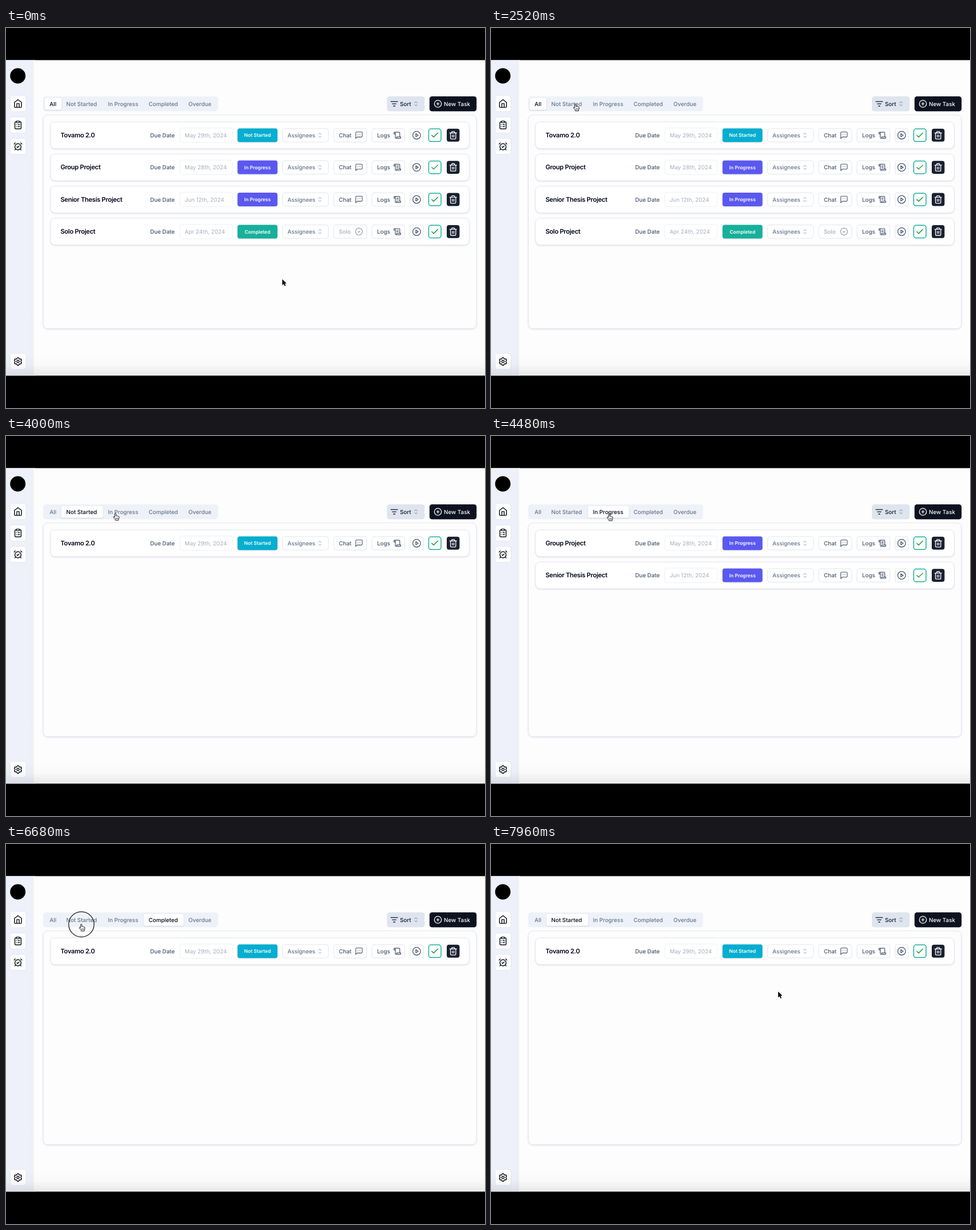
Write an HTML page that moves like this. It is 839 by 667 pixels and loops after 8 s.

```html
<!DOCTYPE html>
<html lang="en">
<head>
<meta charset="utf-8">
<title>Task board</title>
<style>
  html, body { margin: 0; width: 100%; height: 100%; overflow: hidden; background: #000; }
  svg { display: block; width: 100vw; height: 100vh; }
  text { font: 500 9.85px Inter, sans-serif; text-rendering: geometricPrecision; white-space: pre; }
  .title { font-size: 11.2px; font-weight: 600; letter-spacing: -.028em; }
  .date { font-weight: 400; }
  .badge { font-size: 8.5px; font-weight: 600; text-anchor: middle; }
  .raised { filter: drop-shadow(0 1px 1px rgba(15, 23, 42, .13)); }
  .soft { filter: drop-shadow(0 .6px .6px rgba(15, 23, 42, .07)); }
</style>
</head>
<body>
<svg id="stage" viewBox="0 0 839 667"></svg>
<script>
const LOOP = 8000, STEP = 40;
const INK = '#0f172a', SLATE = '#64748b', DEEP = '#475569', LINE = '#e2e8f0', FAINT = '#a6adb9';

const circle = (x, y, r) => `M${x - r} ${y}a${r} ${r} 0 1 0 ${2 * r} 0a${r} ${r} 0 1 0 ${-2 * r} 0`;

function gearPath() {
  const points = [];
  for (let tooth = 0; tooth < 6; tooth++) {
    for (const [angle, radius] of [[-21, 7.6], [-11, 10], [11, 10], [21, 7.6]]) {
      const a = (tooth * 60 + angle - 90) * Math.PI / 180;
      points.push(`${(12 + radius * Math.cos(a)).toFixed(2)} ${(12 + radius * Math.sin(a)).toFixed(2)}`);
    }
  }
  return `M${points.join('L')}Z${circle(12, 12, 3)}`;
}

// Outlines on a 24 unit grid.
const scroll = 'M8 21h12a2 2 0 0 0 2-2v-2H10v2a2 2 0 1 1-4 0V5a2 2 0 1 0-4 0v3h4M19 17V5a2 2 0 0 0-2-2H4';
const ICONS = {
  home: 'M3 9l9-7 9 7v11a2 2 0 0 1-2 2H5a2 2 0 0 1-2-2zM9 22V12h6v10',
  clipboard: 'M9 2h6a1 1 0 0 1 1 1v2a1 1 0 0 1-1 1H9a1 1 0 0 1-1-1V3a1 1 0 0 1 1-1zM16 4h2a2 2 0 0 1 2 2v14a2 2 0 0 1-2 2H6a2 2 0 0 1-2-2V6a2 2 0 0 1 2-2h2M12 11h4M12 16h4M8 11h.01M8 16h.01',
  alarm: circle(12, 13, 8) + 'M5 3L2 6M22 6l-3-3M6.4 18.7L4 21M17.6 18.7L20 21M9 13l2 2 4-4',
  gear: gearPath(),
  filter: 'M3 6h18M7 12h10M10 18h4',
  chevrons: 'M7 15l5 5 5-5M7 9l5-5 5 5',
  plus: circle(12, 12, 10) + 'M8 12h8M12 8v8',
  chat: 'M21 15a2 2 0 0 1-2 2H7l-4 4V5a2 2 0 0 1 2-2h14a2 2 0 0 1 2 2zM8 10h.01M12 10h.01M16 10h.01',
  solo: 'M3.85 8.62a4 4 0 0 1 4.78-4.77 4 4 0 0 1 6.74 0 4 4 0 0 1 4.78 4.78 4 4 0 0 1 0 6.74 4 4 0 0 1-4.77 4.78 4 4 0 0 1-6.75 0 4 4 0 0 1-4.78-4.77 4 4 0 0 1 0-6.76zM9 12l2 2 4-4',
  scroll,
  scrollText: scroll + 'M15 8h-5M15 12h-5',
  play: circle(12, 12, 10) + 'M10 8l6 4-6 4z',
  check: 'M20 6L9 17l-5-5',
  trash: 'M3 6h18M19 6v14a2 2 0 0 1-2 2H7a2 2 0 0 1-2-2V6M8 6V4a2 2 0 0 1 2-2h4a2 2 0 0 1 2 2v2M10 11v6M14 11v6'
};

const icon = (name, x, y, scale, color, width = 2) =>
  `<path d="${ICONS[name]}" transform="translate(${x} ${y}) scale(${scale}) translate(-12 -12)" fill="none" stroke="${color}" stroke-width="${width}" stroke-linecap="round" stroke-linejoin="round"/>`;
const box = (x, y, w, h, r, fill, stroke = 'none', extra = '') =>
  `<rect x="${x}" y="${y}" width="${w}" height="${h}" rx="${r}" fill="${fill}" stroke="${stroke}" ${extra}/>`;
const label = (text, x, y, color, extra = '') =>
  `<text x="${x}" y="${y + 3.6}" fill="${color}" ${extra}>${text}</text>`;

const TABS = [
  { name: 'All', x: 67.8, w: 29.2, rows: [0, 1, 2, 3] },
  { name: 'Not Started', x: 97, w: 73, rows: [0] },
  { name: 'In Progress', x: 170, w: 71.3, rows: [1, 2] },
  { name: 'Completed', x: 241.3, w: 69.8, rows: [3] },
  { name: 'Overdue', x: 311, w: 57.6, rows: [] }
];
const STATUS = { 'Not Started': '#06aed0', 'In Progress': '#5a58f0', 'Completed': '#17b09b' };
const TASKS = [
  ['Tovamo 2.0', 'May 29th, 2024', 'Not Started'],
  ['Group Project', 'May 28th, 2024', 'In Progress'],
  ['Senior Thesis Project', 'Jun 12th, 2024', 'In Progress'],
  ['Solo Project', 'Apr 24th, 2024', 'Completed']
];

function taskRow([title, date, status], index) {
  const y = 188.2, solo = index === 3;
  const button = (x, w) => box(x, y - 11.7, w, 23.4, 4, '#fff', LINE, 'class="soft"');
  return `<g class="row">
    ${box(78, 164.8, 733.3, 46.8, 8, '#fff', LINE, 'class="raised"')}
    ${label(title, 95.4, y + .3, '#020617', 'class="title"')}
    ${label('Due Date', 252.4, y, DEEP)}
    ${box(304.5, y - 12.7, 92, 25.4, 4, '#fff', '#edf0f4')}
    ${label(date, 313, y, FAINT, 'class="date"')}
    ${box(405.5, y - 12, 70, 24, 4, STATUS[status], 'none', 'class="raised"')}
    ${label(status, 440.5, y - .4, '#fff', 'class="badge"')}
    ${button(484.3, 80.4)}${label('Assignees', 493, y, SLATE)}${icon('chevrons', 549.8, y, .47, '#8c98a9')}
    ${button(574, 57.8)}${label(solo ? 'Solo' : 'Chat', 583, y, solo ? FAINT : DEEP)}
    ${icon(solo ? 'solo' : 'chat', 618.3, y, .63, solo ? '#8f98a6' : DEEP, 1.7)}
    ${button(641, 57.6)}${label('Logs', 650, y, DEEP)}
    ${icon(index ? 'scrollText' : 'scroll', 685.5, y, .6, DEEP)}
    ${button(707.8, 23)}${icon('play', 719.3, y, .68, DEEP, 1.9)}
    ${box(740.4, y - 11.1, 21.6, 22.2, 4, '#fff', '#17b09b', 'stroke-width="1.5"')}
    ${icon('check', 751, y, .66, '#158a2c')}
    ${box(772, y - 11.4, 22.4, 22.8, 4, '#18202f')}
    ${icon('trash', 783.2, y, .66, '#fff')}
  </g>`;
}

const sideButton = ([name, y]) =>
  box(7.2, y - 14, 27.8, 28, 4.5, '#fff', '#e6eaf2', 'class="soft"') + icon(name, 21, y, .68, '#0b0f19', 2.1);

document.getElementById('stage').innerHTML = `
  <defs>
    <linearGradient id="edge"><stop stop-color="#e9ebf0"/><stop offset="1" stop-color="#fdfdfe"/></linearGradient>
    <linearGradient id="fade" x2="0" y2="1"><stop stop-opacity="0"/><stop offset=".5" stop-opacity=".018"/><stop offset="1" stop-opacity=".085"/></linearGradient>
  </defs>
  <rect width="839" height="667"/>
  <rect y="56.4" width="839" height="553.8" fill="#fdfdfe"/>
  <rect y="56.4" width="45" height="553.8" fill="#eef1f9"/>
  <rect x="45" y="56.4" width="6" height="553.8" fill="url(#edge)"/>
  <circle cx="20.7" cy="84" r="13.5"/>
  ${[['home', 132.6], ['clipboard', 170.2], ['alarm', 207.8], ['gear', 585.3]].map(sideButton).join('')}
  ${box(65, 120, 306.5, 26.2, 5, '#eef2f8')}
  ${TABS.map(tab => `<g class="tab">${box(tab.x, 122.7, tab.w, 20.8, 3.5, '#fff', 'none', 'class="raised"')}${label(tab.name, tab.x + 8.5, 133, SLATE)}</g>`).join('')}
  ${box(667.2, 120, 66, 26.2, 4.5, '#dfe5ee')}
  ${icon('filter', 680, 133.1, .65, INK)}${label('Sort', 690, 133, INK)}${icon('chevrons', 718, 133, .47, SLATE)}
  ${box(741.8, 120, 82.4, 26.2, 4.5, '#0c1220')}
  ${icon('plus', 756.5, 133, .62, '#fff')}${label('New Task', 767, 133, '#fff')}
  ${box(65.3, 152.7, 758.6, 375, 8, '#fdfdfe', LINE, 'class="raised"')}
  ${TASKS.map(taskRow).join('')}
  <rect y="574" width="839" height="36.2" fill="url(#fade)"/>
  <g id="cursor">
    <circle id="ring" r="22.2" fill="none" stroke="#111" stroke-width="1.2"/>
    <path id="arrow" d="M0 0V10.4L2.4 8.2 4.1 12 5.9 11.2 4.3 7.5H7.4Z" stroke="#fff" stroke-width="1.3" paint-order="stroke" stroke-linejoin="round"/>
    <g id="hand" stroke="#000" stroke-width=".9" stroke-linejoin="round">
      <path fill="#fff" d="M-1.3.8Q-1.3-.4-.2-.4T.9.8V4Q1.8 3.3 2.8 4.3 4 3.8 4.7 4.8 6.2 4.5 6.2 6.2 6.2 8.5 5.2 10V11.8H-.3V10.6Q-2 8.6-3.6 6.4-4 5.2-2.6 5.2L-1.3 6.4Z"/>
      <path fill="none" stroke-width=".7" d="M.6 7.2V9.8M2.3 7.2V9.8M4 7.2V9.8"/>
    </g>
  </g>`;

// Cursor stops: time, x, y.
const PATH = [
  [40, 484, 441], [160, 458, 421], [960, 458, 421], [1160, 432, 401], [1680, 254, 264],
  [1840, 195, 198], [2080, 146, 133], [2240, 146, 133], [2600, 148.5, 133.8],
  [3600, 148.5, 133.8], [4200, 207, 137], [4680, 207, 137], [5240, 283, 137],
  [5920, 283, 137], [6560, 132, 141], [7160, 132, 141], [7960, 503, 259]
];
// Each click ends when its ring vanishes.
const CLICKS = [{ end: 3120, tab: 1 }, { end: 4440, tab: 2 }, { end: 5480, tab: 3 }, { end: 6800, tab: 1 }];

const clamp = v => Math.max(0, Math.min(1, v));
const smooth = v => v * v * (3 - 2 * v);
const mix = (a, b, p) => a + (b - a) * p;
const show = (node, on) => node.setAttribute('display', on ? 'inline' : 'none');

function cursorAt(t) {
  const next = PATH.findIndex(stop => stop[0] >= t);
  if (next === 0) return PATH[0].slice(1);
  const [t0, x0, y0] = PATH[next - 1], [t1, x1, y1] = PATH[next];
  const linear = t < 2080;
  const p = (t - t0) / (t1 - t0), eased = linear ? p : smooth(p);
  return [mix(x0, x1, eased), mix(y0, y1, eased)];
}

const rows = document.querySelectorAll('.row'), tabs = document.querySelectorAll('.tab');
const [cursor, ring, arrow, hand] = ['cursor', 'ring', 'arrow', 'hand'].map(id => document.getElementById(id));

function draw(t) {
  let listed = 0;
  const weights = [1, 0, 0, 0, 0];
  for (const { end, tab } of CLICKS) {
    if (t >= end - 160) listed = tab;
    const p = clamp((t - end + 120) / 110);
    weights.forEach((w, i) => { weights[i] = mix(w, i === tab ? 1 : 0, p); });
  }
  rows.forEach((row, i) => {
    const place = TABS[listed].rows.indexOf(i);
    show(row, place >= 0);
    row.setAttribute('transform', `translate(0 ${place * 56.4})`);
  });
  tabs.forEach((tab, i) => {
    const w = weights[i], [r, g, b] = [[100, 2], [116, 6], [139, 23]].map(([off, on]) => mix(off, on, w));
    tab.firstChild.setAttribute('opacity', w);
    tab.lastChild.setAttribute('fill', `rgb(${r},${g},${b})`);
  });

  const [x, y] = cursorAt(t);
  const overTabs = x > 67 && x < 369 && y > 122 && y < 144;
  cursor.setAttribute('transform', `translate(${x} ${y})`);
  show(hand, overTabs);
  show(arrow, !overTabs);
  show(ring, CLICKS.some(({ end }) => t >= end - 240 && t < end));
}

function tick() {
  draw(Math.floor(performance.now() % LOOP / STEP) * STEP);
  requestAnimationFrame(tick);
}
tick();
</script>
</body>
</html>
```
